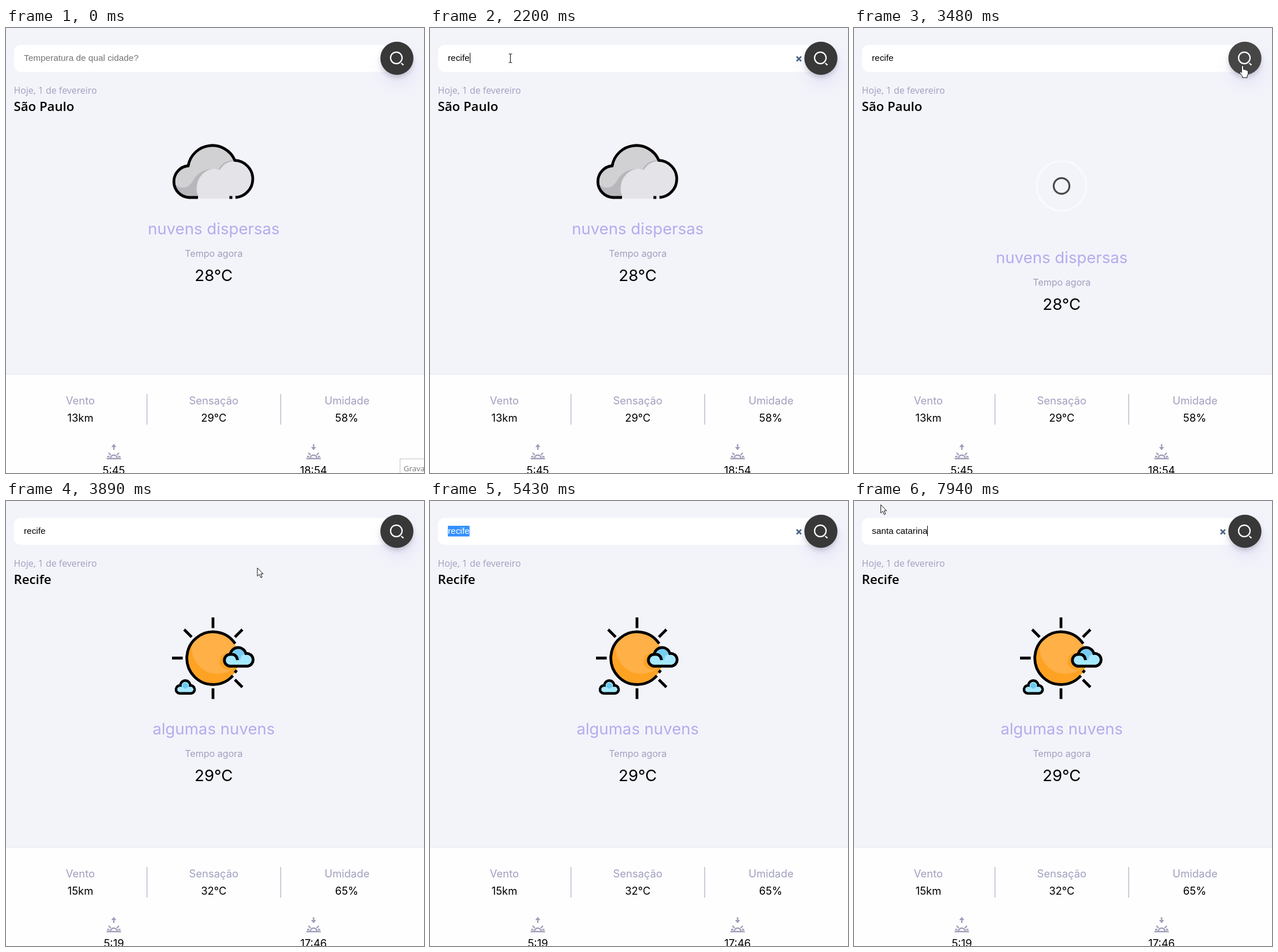
Recreate the animation shown at these times as an HTML page. Size 725 by 772 pixels, loop 8 s.

```html
<!DOCTYPE html>
<html lang="pt-BR">
<head>
<meta charset="utf-8">
<title>Clima</title>
<style>
html, body { margin: 0; width: 100%; height: 100%; overflow: hidden; background: #f3f4fa; }
svg { display: block; position: absolute; left: 0; top: 0; }
text { font-family: Inter, sans-serif; white-space: pre; }
.mid { text-anchor: middle; }
.head { font-family: "Open Sans", "Noto Sans", sans-serif; }
.field { font: 15.36px "Liberation Sans", Arial, sans-serif; }
.soft { fill: #a09fbe; }
.line { fill: none; stroke: #000; stroke-width: 4.8; }
.icon { fill: none; stroke: #a09fb9; stroke-width: 2.4; }
</style>
</head>
<body>
<svg width="725" height="772" viewBox="0 0 725 772">
  <defs>
    <filter id="wide" x="-80%" y="-80%" width="260%" height="260%"><feGaussianBlur stdDeviation="12"/></filter>
    <filter id="tight" x="-60%" y="-60%" width="220%" height="220%"><feGaussianBlur stdDeviation="5"/></filter>
    <clipPath id="disc"><circle cx="359" cy="273" r="45"/></clipPath>
    <g id="halfSun" class="icon">
      <path d="M-12.5 12H12.5M-6 12a6 6 0 0 1 12 0M-9 2l3.8 3.8M9 2l-3.8 3.8M-11.5 8.5h4M11.5 8.5h-4"/>
    </g>
  </defs>

  <rect width="725" height="772" fill="#f3f4fa"/>
  <rect x="14" y="29.5" width="676" height="46.5" rx="11" fill="#fff"/>
  <circle cx="682" cy="70" r="32" fill="#dddcf5" opacity=".5" filter="url(#wide)"/>
  <circle cx="678" cy="58" r="27" fill="#55556a" opacity=".32" filter="url(#tight)"/>
  <circle id="button" cx="678" cy="52.5" r="28.7" fill="#383838"/>
  <g fill="none" stroke="#fff" stroke-width="2.2">
    <circle cx="677" cy="51.8" r="10"/>
    <path d="M685.6 61l3.8 3.4"/>
  </g>
  <path id="clear" d="M635.8 49.5l8 8m0-8l-8 8" stroke="#4a6285" stroke-width="2.5"/>

  <rect id="mark" y="43" height="18.5" fill="#3390ff"/>
  <text id="hint" class="field" x="31" y="57" fill="#757575">Temperatura de qual cidade?</text>
  <text id="value" class="field" x="31" y="57"><tspan id="plain"></tspan><tspan id="picked" fill="#fff"></tspan></text>
  <rect id="caret" y="43" width="1" height="18" fill="#000"/>

  <text class="head soft" x="13.5" y="113.5" font-size="15.9">Hoje, 1 de fevereiro</text>
  <text id="city" class="head" x="13.5" y="144" font-size="22.2" font-weight="600"></text>

  <g id="cloud">
    <path fill="#b8b7bb" d="M316 239A42.5 42.5 0 0 1 397 229.7A32.3 32.3 0 0 1 398 294.2H317A27.6 27.6 0 0 1 316 239Z"/>
    <path fill="#d1d1d4" d="M316 239A42.5 42.5 0 0 1 397 229.7Q376 229 369 245Q338 242 326 262Q318 277 307 277Q297 277 291 268A27.6 27.6 0 0 1 316 239Z"/>
    <path fill="#e4e3e8" d="M336 296C325 283 330 247 362 244L371 246Q380 231 398 231A30.5 30.5 0 0 1 398 296Z"/>
    <path class="line" d="M333 294H317A27.6 27.6 0 0 1 316 239A42.5 42.5 0 0 1 397 229.7A32.2 32.2 0 0 1 398 294M387.5 294h5"/>
  </g>

  <g id="sun">
    <g clip-path="url(#disc)">
      <circle cx="359" cy="273" r="46" fill="#fda223"/>
      <circle cx="367" cy="255" r="45" fill="#ffb046"/>
      <circle cx="385" cy="278" r="14.5" fill="#fda223"/>
    </g>
    <path class="line" d="M397.5 247.5A45.7 45.7 0 1 0 393.5 303M397 298l3-4.5"/>
    <path class="line" d="M359 202v18.5M359 325v18.5M288 272.5h18.5M309 223l13 13M397 236l13-13M397 310l13 13"/>
    <path fill="#a5e8ff" d="M389 286.5A10 10 0 0 1 389 266A13.8 13.8 0 0 1 416 264.5A11 11 0 0 1 419 286.5Z"/>
    <path fill="#78cdf2" d="M389 266A13.8 13.8 0 0 1 416 264.5Q407 267 406 276H402Q400 266 389 266Z"/>
    <path class="line" d="M389 286.5A10 10 0 0 1 389 266A13.8 13.8 0 0 1 416 264.5A11 11 0 0 1 419 286.5ZM389 266Q400 265 401.5 276"/>
    <path class="line" style="fill:#a5e8ff;stroke-width:4.4" d="M301 333.8A6.5 6.5 0 0 1 302.5 320A8.5 8.5 0 0 1 319.5 320A6.5 6.5 0 0 1 321 333.8Z"/>
    <circle cx="311" cy="320.5" r="5" fill="#6cc9ee"/>
  </g>

  <g id="loader" fill="none" stroke-width="3.2">
    <circle id="ringA" cx="360" cy="274" stroke="#333"/>
    <circle id="ringB" cx="360" cy="274" stroke="#fff"/>
  </g>

  <g id="report" class="mid">
    <text id="sky" x="360.3" y="358" font-size="27.65" fill="#b5abee"></text>
    <text class="soft" x="360.3" y="397" font-size="16.1">Tempo agora</text>
    <text id="temp" x="360.3" y="439" font-size="27.65"></text>
  </g>

  <rect y="600.5" width="725" height="172" fill="#fefefe"/>
  <path d="M0 600.5H725" stroke="#e1e3f0"/>
  <path d="M244.5 635V688M476.5 635V688" stroke="#a3a2bd"/>
  <g class="mid" font-size="18.43">
    <g class="soft">
      <text x="129" y="653">Vento</text>
      <text x="360.3" y="653">Sensação</text>
      <text x="591.5" y="653">Umidade</text>
    </g>
    <text id="wind" x="129" y="683"></text>
    <text id="feel" x="360.3" y="683"></text>
    <text id="damp" x="591" y="683"></text>
    <text id="rise" x="187" y="774"></text>
    <text id="set" x="533.5" y="774"></text>
  </g>
  <use href="#halfSun" x="187" y="735"/>
  <use href="#halfSun" x="533.5" y="735"/>
  <path class="icon" d="M187 732V725M533.5 722V729"/>
  <path fill="#a09fb9" d="M182.5 727L187 721.5L191.5 727ZM529 727L533.5 732.5L538 727Z"/>

  <g id="tip">
    <rect x="683.5" y="747.5" width="50" height="40" fill="#fff" stroke="#c4c4c4"/>
    <text class="head" x="689.5" y="769" font-size="13.5" fill="#777">Gravar</text>
  </g>

  <g id="arrow"><path d="M0 0V14.3L3.4 11.2L6 17L8.3 16L5.8 10.4H10Z" fill="#fff" stroke="#111"/></g>
  <g id="beam"><path d="M-3 -7.5H-1L0 -6.5L1 -7.5H3M0 -6.5V6.5M-3 7.5H-1L0 6.5L1 7.5H3" fill="none" stroke="#222" stroke-width="1.2"/></g>
  <g id="hand"><path d="M-1.8 1Q0 -1 1.6 1V7Q3.2 6 4.5 7.6Q6.2 7 7.2 8.6Q9.4 8 9.6 10.5V14.5L8 18V21H-.5V18.5L-5 12.5Q-5.3 10.5 -3.6 10.7L-1.8 12.5Z" fill="#fff" stroke="#111"/></g>
</svg>

<script>
const $ = id => document.getElementById(id);
const LOOP = 8000, LOAD = 3360, DONE = 3690, LEFT = 31;

const saoPaulo = { city: 'São Paulo', sky: 'nuvens dispersas', temp: '28°C', wind: '13km',
  feel: '29°C', damp: '58%', rise: '5:45', set: '18:54' };
const recife = { city: 'Recife', sky: 'algumas nuvens', temp: '29°C', wind: '15km',
  feel: '32°C', damp: '65%', rise: '5:19', set: '17:46' };

// time at which each letter appears
const typed = [
  ['recife', [1270, 1410, 1670, 1870, 2070, 2200]],
  ['santa catarina', [5560, 5690, 6090, 6170, 6260, 6350, 6550, 6660, 6770, 6880, 7150, 7260, 7370, 7480]]
];

// pointer path: time, x, y
const path = [
  [70, 724, 748], [200, 650, 560], [400, 400, 240], [560, 230, 100], [680, 132, 50], [810, 139.5, 52.5],
  [2600, 139.5, 52.5], [2760, 230, 55], [3000, 470, 60], [3200, 645, 64], [3350, 674, 65],
  [3540, 674, 65], [3700, 580, 90], [3890, 436, 116], [3950, 436, 116], [4080, 280, 96],
  [4220, 185, 63], [4360, 172, 60], [4490, 155, 56], [5160, 155, 56], [5290, 62, 52], [5400, -12, 48]
];

function pointer(t) {
  if (t >= 7940) return [46.5, 6.5];
  if (t < 70 || t > 5400) return [-50, -50];
  const i = path.findIndex(p => p[0] >= t);
  if (i < 1) return path[0].slice(1);
  const [t0, x0, y0] = path[i - 1], [t1, x1, y1] = path[i];
  const k = (t - t0) / (t1 - t0);
  return [x0 + (x1 - x0) * k, y0 + (y1 - y0) * k];
}

const show = (id, on) => $(id).setAttribute('visibility', on ? 'visible' : 'hidden');
const put = (id, text) => { if ($(id).textContent !== text) $(id).textContent = text; };

function ring(id, k, strength) {
  $(id).setAttribute('r', 2.2 * (1 + 19 * (1 - (1 - k) ** 4.6)));
  $(id).setAttribute('stroke-opacity', strength);
}

function drawField(t, x, over) {
  const [word, times] = typed[t < 5560 ? 0 : 1];
  const text = word.slice(0, times.filter(at => at <= t).length);
  let cut = text.length;
  if (t >= 5160 && t < 5560) cut = Math.max(0, Math.min(6, Math.round((x - LEFT) / 6.3)));
  put('plain', text.slice(0, cut));
  put('picked', text.slice(cut));

  const start = LEFT + $('plain').getComputedTextLength();
  const end = LEFT + $('value').getComputedTextLength();
  $('mark').setAttribute('x', start);
  $('mark').setAttribute('width', cut < text.length ? end - start : 0);
  $('caret').setAttribute('x', text ? Math.round(start) : LEFT);

  const focus = (t >= 880 && t < LOAD) || t >= 4960;
  show('caret', focus && cut === text.length);
  show('hint', !text);
  show('clear', text && (focus || over));
}

function draw(t) {
  const [x, y] = pointer(t);
  const onButton = Math.hypot(x - 678, y - 52.5) < 28.7;
  const onField = !onButton && x > 14 && x < 650 && y > 29 && y < 76;
  const kind = onButton ? 'hand' : onField ? 'beam' : 'arrow';
  for (const id of ['arrow', 'beam', 'hand']) {
    show(id, id === kind);
    $(id).setAttribute('transform', `translate(${x} ${y})`);
  }
  $('button').setAttribute('fill', onButton ? '#464646' : '#383838');
  show('tip', t < 140);
  drawField(t, x, onField);

  const loading = t >= LOAD && t < DONE, fresh = t >= DONE;
  const data = fresh ? recife : saoPaulo;
  for (const id in data) put(id, data[id]);
  show('cloud', t < LOAD);
  show('sun', fresh);
  show('loader', loading);
  $('report').setAttribute('transform', `translate(0 ${fresh ? 47 : loading ? 49.5 : 0})`);
  if (loading) {
    const k = (t - LOAD) / 1800;
    ring('ringA', k, (1 - k) ** 1.8);
    ring('ringB', k + .5, .55 * (1 - 2 * k));
  }
}

const begin = performance.now();
function tick() {
  draw((performance.now() - begin) % LOOP);
  requestAnimationFrame(tick);
}
tick();
</script>
</body>
</html>
```
